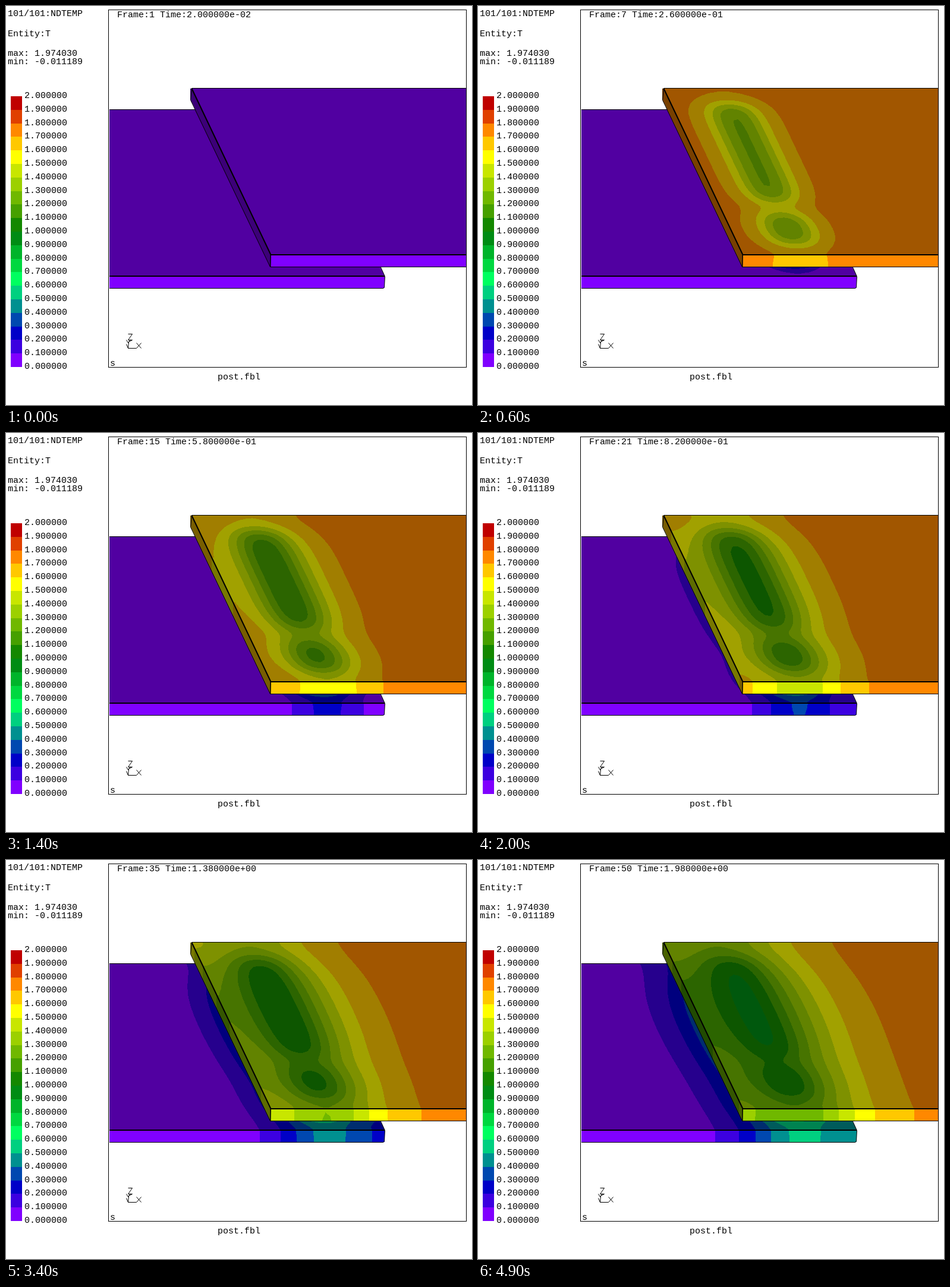
Recreate the animation shown at these times as an HTML page with a canvas. Size 784 px wide and 672 px high, loop 5 s.

```html
<!DOCTYPE html>
<html lang="en">
<head>
<meta charset="utf-8">
<title>NDTEMP</title>
<style>
  html, body { margin: 0; width: 100%; height: 100%; overflow: hidden; background: #fff; }
  canvas, svg { position: absolute; left: 0; top: 0; display: block; }
  text { font: 15px "Liberation Mono", "DejaVu Sans Mono", monospace; fill: #000; }
</style>
</head>
<body>
<canvas id="stage" width="784" height="672"></canvas>
<svg id="labels" width="784" height="672"></svg>
<script>
const W = 784, H = 672, FRAMES = 50, STEP_MS = 100;
const ctx = document.getElementById('stage').getContext('2d');
const svg = document.getElementById('labels');

// Colour scale, 0.1 per band, from cold to hot
const BANDS = ['8000ff', '3c00e0', '0000c8', '0048b0', '009090', '00d080', '00ff60',
  '00d840', '00b42a', '008c14', '148800', '46a000', '70b800', '9cd000', 'c8e600',
  'ffff00', 'ffc800', 'ff8800', 'e04000', 'c00000'];
const pack = (hex, shade) => {
  const [r, g, b] = [0, 2, 4].map(i => Math.round(parseInt(hex.slice(i, i + 2), 16) * shade));
  return (255 << 24 | b << 16 | g << 8 | r) >>> 0;
};
const palette = shade => Uint32Array.from(BANDS, hex => pack(hex, shade));
const FACE = palette(1), TOP = palette(0.63), SIDE = palette(0.47);

// Heat flow in the hot plate; the cold plate is its point mirror
const NU = 60, NV = 70, NZ = 4, CELL = 8;
const HOT = 1.735, MID = HOT / 2, DIFF = 2500, LEAK = 1.1;
const SUB = 12, DT = 0.04 / SUB, RATE = DIFF * DT / CELL ** 2;
const SLANT = 0.475, DEPTH = 280, OVERLAP = 192;
const clamp = (x, lo, hi) => x < lo ? lo : x > hi ? hi : x;
const at = (i, j, k) => (k * NV + j) * NU + i;

// Share of cell n (size s) lying inside lo..hi
const cover = (n, s, lo, hi) => clamp((Math.min(hi, n * s + s) - Math.max(lo, n * s)) / s, 0, 1);
const weld = new Float32Array(NU * NV);
for (let j = 0; j < NV; j++) {
  const along = cover(j, 4, 28, 187) + cover(j, 4, 212, 259);
  for (let i = 0; i < NU; i++) weld[j * NU + i] = along * cover(i, CELL, 70, 124);
}

function advance(a, b) {
  for (let k = 0; k < NZ; k++) for (let j = 0; j < NV; j++) for (let i = 0; i < NU; i++) {
    const p = at(i, j, k), c = a[p];
    let flow = -6 * c;
    flow += i > 0 ? a[p - 1] : c;
    flow += i < NU - 1 ? a[p + 1] : c;
    flow += j > 0 ? a[p - NU] : c;
    flow += j < NV - 1 ? a[p + NU] : c;
    flow += k > 0 ? a[p - NU * NV] : c;
    flow += k < NZ - 1 ? a[p + NU * NV] : c + LEAK * weld[j * NU + i] * (MID - c);
    b[p] = c + RATE * flow;
  }
}

function simulate() {
  let a = new Float32Array(NU * NV * NZ).fill(HOT), b = a.slice();
  const out = [];
  for (let n = 0; n < FRAMES; n++) {
    const count = n ? SUB : SUB / 2;
    for (let s = 0; s < count; s++) { advance(a, b); [a, b] = [b, a]; }
    out.push(a.slice());
  }
  return out;
}
const fields = simulate();

// Temperature at u, v on the plate and z (0 outer face, 1 welded face)
function sample(f, u, v, z) {
  const x = clamp(u / CELL - 0.5, 0, NU - 1.001);
  const y = clamp(v / 4 - 0.5, 0, NV - 1.001);
  const w = clamp(z * NZ - 0.5, 0, NZ - 1.001);
  const i = x | 0, j = y | 0, k = w | 0, fx = x - i, fy = y - j, fz = w - k;
  const row = p => f[p] + (f[p + 1] - f[p]) * fx;
  const layer = p => { const r = row(p); return r + (row(p + NU) - r) * fy; };
  const p = at(i, j, k), near = layer(p);
  return fz ? near + (layer(p + NU * NV) - near) * fz : near;
}

const image = ctx.createImageData(W, H);
const pixels = new Uint32Array(image.data.buffer);

function paintPlates(n) {
  const f = fields[n];
  const band = t => n ? clamp(Math.floor(t * 10), 0, 19) : 0;
  const hot = (u, v, z) => band(sample(f, u, v, z));
  const cold = (u, v, z) => band(HOT - sample(f, OVERLAP - u, v, z));
  pixels.fill(0xffffffff);
  for (let y = 139; y < 475; y++) for (let x = 174; x < 774; x++) {
    const u = x - 312 - SLANT * (y - 139);
    const v = (x - 312) / SLANT, drop = y - 139 - v;
    const low = x - 445 - SLANT * (y - 455);
    let c = 0;
    if (y < 419 && u >= 0) c = TOP[hot(u, y - 139, 0)];
    else if (y >= 419 && y < 439 && x >= 445) c = FACE[hot(x - 445, DEPTH, (y - 419) / 20)];
    else if (x >= 310 && x < 445 && drop >= 0 && drop < 22.5) c = SIDE[hot(0, v, drop / 22.5)];
    else if (y >= 175 && y < 455 && low <= OVERLAP) c = TOP[cold(low, y - 175, 1)];
    else if (y >= 455 && x < 637) c = FACE[cold(x - 445, DEPTH, 1 - (y - 455) / 20)];
    if (c) pixels[y * W + x] = c;
  }
  ctx.putImageData(image, 0, 0);
}

function line(width, ...pts) {
  ctx.lineWidth = width;
  ctx.beginPath();
  for (let i = 0; i < pts.length; i += 2) ctx.lineTo(pts[i], pts[i + 1]);
  ctx.stroke();
}

function paintLines() {
  ctx.strokeStyle = '#000';
  line(1, 174, 174.5, 318, 174.5);
  line(2, 174, 455, 637, 455);
  line(1, 630.5, 440, 637.5, 455.5, 636.5, 473, 635, 475.5, 174, 475.5);
  line(1, 774, 138.5, 312.5, 138.5, 310.5, 158.5, 444.5, 439.5, 774, 439.5);
  line(2, 312.5, 139, 445.5, 419, 774, 419);
  line(1.5, 445.3, 419, 444.8, 439);
  ctx.lineWidth = 1;
  ctx.strokeRect(172.5, 6.5, 602, 602);
  // Axis cross
  line(1, 205.5, 552.5, 212.5, 552.5, 205.5, 562.5, 212.5, 562.5);
  line(1, 212.5, 562.5, 206.5, 565.5, 205.5, 576.5, 219.5, 576.5);
  line(1, 202.5, 569.5, 205.5, 576.5);
  line(1, 202.5, 562.5, 205.5, 567.5, 208.5, 562.5);
  line(1, 219.5, 567.5, 227.5, 576.5);
  line(1, 227.5, 567.5, 219.5, 576.5);
}

function paintScale() {
  BANDS.forEach((hex, i) => {
    const top = Math.round(608 - (i + 1) * 22.8), end = Math.round(608 - i * 22.8);
    ctx.fillStyle = '#' + hex;
    ctx.fillRect(8, top, 19, end - top);
  });
}

function label(x, y, str) {
  const el = document.createElementNS('http://www.w3.org/2000/svg', 'text');
  el.setAttribute('x', x);
  el.setAttribute('y', y);
  el.textContent = str;
  return svg.appendChild(el);
}
label(3, 17, '101/101:NDTEMP');
label(3, 51, 'Entity:T');
label(3, 84, 'max: 1.974030');
label(3, 98, 'min: -0.011189');
label(175, 606, 's');
label(356, 629, 'post.fbl');
for (let i = 0; i <= 20; i++) label(31, Math.round(611 - i * 22.8), (i / 10).toFixed(6));
const title = label(187, 19, '');

const sci = t => t.toExponential(6).replace(/(\d)$/, d => '0' + d);

let shown = -1;
function tick() {
  const n = Math.floor(performance.now() / STEP_MS) % FRAMES;
  if (n !== shown) {
    shown = n;
    paintPlates(n);
    paintScale();
    paintLines();
    title.textContent = `Frame:${n + 1} Time:${sci(0.02 + 0.04 * n)}`;
  }
  requestAnimationFrame(tick);
}
tick();
</script>
</body>
</html>
```
